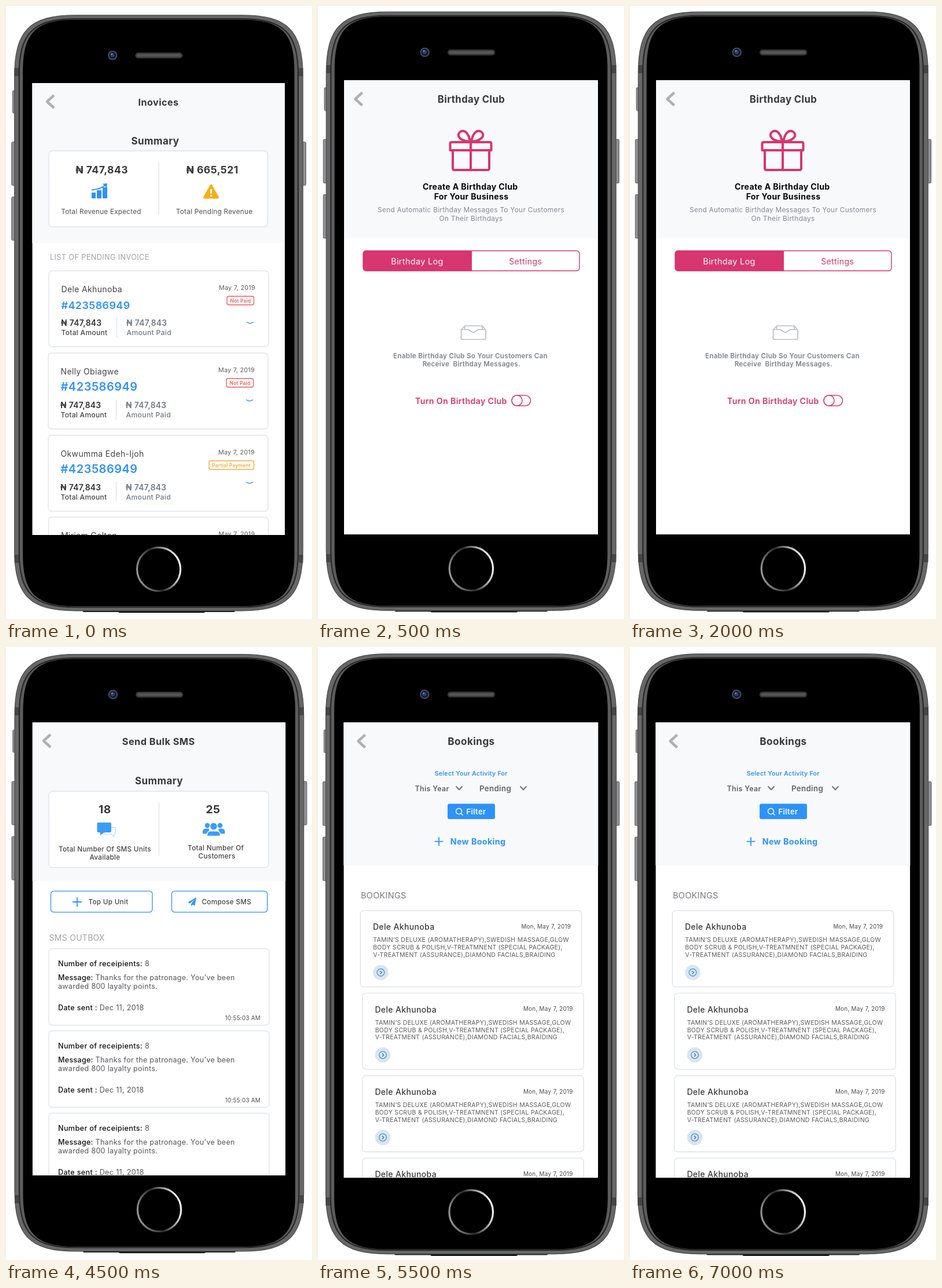
These frames come from a looping animation (529x1058 px, 8000 ms). An HTML page:

```html
<!DOCTYPE html>
<html lang="en">
<head>
<meta charset="utf-8">
<title>Business app screens</title>
<style>
html, body { margin: 0; width: 100%; height: 100%; overflow: hidden; background: #fff; }
svg { display: block; width: 100vw; height: 100vh; }
text { font-family: Inter, "Open Sans", sans-serif; letter-spacing: .025em; white-space: pre; font-optical-sizing: none; }
</style>
</head>
<body>
<svg id="stage" viewBox="0 0 529 1058" xmlns="http://www.w3.org/2000/svg"></svg>
<script>
const BLUE = '#2d93fb', PINK = '#d7366f', INK = '#38383b', GREY = '#737a84', EDGE = '#dfe4ec';
const LOOP = 8000, CUTS = [0, 500, 3000, 5500];
const CURRENCY = '\u20a6';

const box = (x, y, x2, y2, r, fill, stroke = 'none', w = 1.3) =>
  `<rect x="${x}" y="${y}" width="${x2 - x}" height="${y2 - y}" rx="${r}" fill="${fill}" stroke="${stroke}" stroke-width="${w}"/>`;
const line = (d, color, w = 1.5, fill = 'none') =>
  `<path d="${d}" fill="${fill}" stroke="${color}" stroke-width="${w}" stroke-linejoin="round"/>`;
const shape = (d, color) => `<path d="${d}" fill="${color}"/>`;
const dot = (x, y, r, fill, stroke = 'none', w = 1.5) =>
  `<circle cx="${x}" cy="${y}" r="${r}" fill="${fill}" stroke="${stroke}" stroke-width="${w}"/>`;
const text = (x, y, str, size, color = INK, weight = 400, anchor = 'start') =>
  `<text x="${x}" y="${y}" font-size="${size}" fill="${color}" font-weight="${weight}" text-anchor="${anchor}">${str}</text>`;
const mid = (x, y, str, size, color, weight) => text(x, y, str, size, color, weight, 'middle');
const end = (x, y, str, size, color, weight) => text(x, y, str, size, color, weight, 'end');
const at = (x, y, body) => `<g transform="translate(${x} ${y})">${body}</g>`;

// Rectangle whose corners ease into the straight sides
const smoothBox = (x, y, x2, y2, r, fill, stroke, w) => {
  const n = r * .25, f = r - n;
  return line(`M${x} ${y + r}c0 ${-f} ${n} ${-r} ${r} ${-r}H${x2 - r}c${f} 0 ${r} ${n} ${r} ${r}` +
    `V${y2 - r}c0 ${f} ${-n} ${r} ${-r} ${r}H${x + r}c${-f} 0 ${-r} ${-n} ${-r} ${-r}z`
      .replace(`c${f} 0 ${r} ${n}`, `c${f} 0 ${r} ${n}`), stroke, w, fill);
};

const card = (x, y, x2, y2) => box(x, y, x2, y2, 6, '#fff', EDGE, 1.4);
const header = (bottom, title, cx, base, size, backX, backY) =>
  box(40, 120, 490, bottom, 0, '#f8f9fb') +
  line(`M${backX + 12} ${backY - 11}l-12 11 12 11`, '#b0b0b1', 4.5) +
  mid(cx, base, title, size, INK, 700);
const plus = (x, y, r) => line(`M${x - r} ${y}h${2 * r}M${x} ${y - r}v${2 * r}`, BLUE, 1.8);

function phone() {
  const side = (x, y, y2) => box(x, y, x + 7, y2, 2, '#929396', '#5b5b5d', 1);
  const bands = [104, 946].map(y => box(15, y, 22.5, y + 14, 0, '#454546') + box(507.5, y, 515, y + 14, 0, '#454546')).join('');
  return side(11.8, 143, 182) + side(10, 232, 307) + side(10, 327, 402) + side(513, 232, 307) +
    box(133, 1038, 397, 1045, 2, '#111') + box(195, 1038, 345, 1046.3, 2, '#111') +
    smoothBox(15, 12.5, 514.7, 1043, 106, '#676768', '#4b4b4c', 1.2) + bands +
    smoothBox(23, 19, 506.5, 1036.5, 97, '#5c5c5d', '#252526', 2) +
    smoothBox(29.5, 20.5, 500, 1035, 90, '#000', 'none', 0) +
    dot(185, 82, 8.2, '#4b4c50') + dot(185, 82, 6, '#15182b') + dot(184.5, 81.5, 3.6, '#22408f') + dot(183.5, 80, 1.3, '#7890cf') +
    box(224.5, 77.5, 306, 87, 4.8, '#3d3d3e', '#29292a', 1) + box(227, 80, 303.5, 84.5, 2.2, '#555556') +
    dot(265, 971, 37.6, '#000', 'url(#ring)', 3.2);
}

function invoices() {
  const rows = [
    ['Dele Akhunoba', 'Not Paid', 17.9, 74, 457],
    ['Nelly Obiagwe', 'Not Paid', 20, 73, 599],
    ['Okwumma Edeh-Ijoh', 'Partial Payment', 20, 73, 741],
    ['Miriam Colton', 'Not Paid', 20, 73.5, 882]
  ];
  const sum = CURRENCY + ' 747,843';
  const row = ([name, state, idSize, x, y], i) => {
    const part = state[0] === 'P', color = part ? '#f5ab3a' : '#ec6060';
    const left = part ? 278 : 308, drop = i ? 82 : 90;
    return at(x, y, card(0, 0, 380, 131) +
      text(21.5, 37, name, 14, '#444') +
      end(357, 33, 'May 7, 2019', 10.8, '#5d5d60') +
      box(left, 44, part ? 355.5 : 354.5, 58.8, 3, '#fff', color, 1.4) +
      mid((left + 355) / 2, 54.6, state, 8.4, color, 600) +
      text(21.5, i ? 65 : 66, '#423586949', idSize, BLUE, 600) +
      text(21, 94.5, sum, 13.8, '#303033', 600) +
      text(21.5, 110.8, 'Total Amount', 12, '#444', 500) +
      line('M117.5 80v35', EDGE, 1.3) +
      text(134, 95.3, sum, 13.8, GREY, 600) +
      text(134.5, 110.8, 'Amount Paid', 12.2, GREY, 500) +
      line(`M342 ${drop - 1.5}q6 4.5 12 0`, BLUE, 1.3));
  };
  const chart = shape('M148 322h7v10h-7zM157 318h8v14h-8zM167 313h8v19h-8z', BLUE) +
    line('M148 317.5Q164 316 172 309', BLUE, 2) + shape('M167 307l8-1-1 8z', BLUE);
  const warn = line('M354.5 310L366 330.5H343z', '#f5b014', 4, '#f5b014') +
    line('M354.5 316v7.5', '#fff', 3) + dot(354.5, 327.5, 1.8, '#fff');
  return header(409, 'Inovices', 263.5, 171.5, 16.2, 71, 165) +
    mid(258, 239, 'Summary', 17, INK, 700) +
    card(74, 250, 452.5, 381) + line('M264 270v91', EDGE, 1.3) +
    mid(165.7, 289, sum, 17.6, INK, 700) + mid(356.7, 289, CURRENCY + ' 665,521', 17.6, INK, 700) +
    chart + warn +
    mid(164.5, 358.5, 'Total Revenue Expected', 11.6, '#505054') +
    mid(360, 358.5, 'Total Pending Revenue', 11.7, '#505054') +
    text(76, 438, 'LIST OF PENDING INVOICE', 12.8, '#a2a2a5') +
    rows.map(row).join('');
}

function birthday() {
  const gift = line('M233 249v31q0 3 3 3h57q3 0 3-3v-31M231 235h66q2.5 0 2.5 2.5V249H228.5v-11.5q0-2.5 2.5-2.5zM264 235v48' +
    'M263 234C260 218 253 213 246 217C238 223 245 233 263 234M265 234C268 218 275 213 282 217C290 223 283 233 265 234', PINK, 4);
  const tray = line('M247.5 559v14.5q0 2 2 2h38.5q2 0 2-2V559l-6-7h-30zM247.5 558.5h12.5l8.5 5.5 8.5-5.5h13M253.5 552v6M284 552v6', '#bbbec2', 1.7);
  return header(400, 'Birthday Club', 265, 167, 16.7, 64.5, 160.5) + gift +
    mid(263.3, 316.5, 'Create A Birthday Club', 14.1, '#050505', 700) +
    mid(265, 334, 'For Your Business', 14, '#050505', 700) +
    mid(264.5, 356, 'Send Automatic Birthday Messages To Your Customers', 11.8, '#858a91') +
    mid(264.5, 370.5, 'On Their Birthdays', 11.9, '#858a91') +
    box(78, 422.5, 452, 457, 5, '#fff', PINK, 1.4) +
    shape('M83 422h183v35.5H83q-5 0-5-5v-25.5q0-5 5-5z', PINK) +
    mid(171.5, 445.5, 'Birthday Log', 14.4, '#fff') + mid(358.7, 445.5, 'Settings', 14.1, PINK) + tray +
    mid(263.5, 608, 'Enable Birthday Club So Your Customers Can', 11.7, '#7d838a', 600) +
    mid(265.3, 622, 'Receive  Birthday Messages.', 11.6, '#7d838a', 600) +
    text(168, 686.5, 'Turn On Birthday Club', 14.2, PINK, 600) +
    box(335, 672, 367.5, 690, 9, '#fff', PINK, 1.5) + dot(344, 681, 9, '#fff', PINK);
}

function sms() {
  const b = s => `<tspan font-weight="500" fill="#111">${s}</tspan>`;
  const row = y => at(74, y, card(0, 0, 381, 132) +
    text(16, 30.5, b('Number of receipients:') + ' 8', 12.7, '#55565a') +
    text(16, 54, b('Message:') + ' Thanks for the patronage. You\u2019ve been', 12.5, '#55565a') +
    text(16, 69, 'awarded 800 layalty points.', 12.5, '#55565a') +
    text(16, 106.5, b('Date sent :') + ' Dec 11, 2018', 12.6, '#55565a') +
    end(366, 123, '10:55:03 AM', 9.9, '#4d4d50'));
  const sky = '#3b9cf8';
  const bubbles = line('M170.5 311.5h18.5v11.5h-2v4l-5-4h-11.5z', '#a9d2fb', 1, '#fff') +
    shape('M159 303h21q2 0 2 2v13q0 2-2 2h-10l-7 5v-5h-4q-1.5 0-1.5-2v-13q0-2 1.5-2z', sky);
  const people = dot(348, 308, 4.3, sky) + dot(370, 308, 4.3, sky) +
    shape('M340 322v-3q0-5.5 6-5.5h5v9zM378.5 322v-3q0-5.5-6-5.5h-5v9z', sky) +
    line('M347.5 326.5v-2q0-7 7-7h9q7 0 7 7v2z', '#fff', 1.5, sky) + dot(359, 309.5, 6.5, sky, '#fff', 1.3);
  const plane = shape('M329 432l-15 9 4 1.7 8.5-7.7-6.5 8.5v4l2.3-2.8 4 1.7z', BLUE);
  return header(404, 'Send Bulk SMS', 263.7, 168.5, 16.4, 65, 162) +
    mid(264.5, 236.5, 'Summary', 17, INK, 700) +
    card(74, 249, 454, 380.5) + line('M264.5 269v91', EDGE, 1.3) +
    mid(171, 287, '18', 19.3, INK, 700) + mid(358, 287, '25', 19.3, INK, 700) + bubbles + people +
    mid(171, 353, 'Total Number Of SMS Units', 11.7, '#444', 500) + mid(171, 367, 'Available', 11.7, '#444', 500) +
    mid(362.7, 350.5, 'Total Number Of', 11.8, '#444', 500) + mid(364.5, 364.5, 'Customers', 11.8, '#444', 500) +
    box(77.5, 421.3, 253, 457.7, 5, '#fff', BLUE, 1.3) + box(286.5, 421.3, 451.7, 457.7, 5, '#fff', BLUE, 1.3) +
    plus(123, 440, 8) + text(142.5, 444.3, 'Top Up Unit', 11.7, '#444', 500) +
    plane + text(338.5, 444.3, 'Compose SMS', 11.7, '#444', 500) +
    text(74.5, 506.5, 'SMS OUTBOX', 13.9, '#a2a2a5') +
    [520.5, 662.5, 804.5].map(row).join('');
}

function bookings() {
  const services = [
    'TAMIN\u2019S DELUXE (AROMATHERAPY),SWEDISH MASSAGE,GLOW',
    'BODY SCRUB &amp; POLISH,V-TREATMNENT (SPECIAL PACKAGE),',
    'V-TREATMENT (ASSURANCE),DIAMOND FACIALS,BRAIDING'
  ];
  const row = i => at(i ? 76.7 : 73.2, 455 + i * 142.4, card(0, 0, 382.5, 131.5) +
    text(21.7, 33.2, 'Dele Akhunoba', 14, '#3c3c3f', 500) +
    end(364, 31, 'Mon, May 7, 2019', 9.95, '#4b4b4e') +
    services.map((s, k) => text(22, 54.3 + k * 12.9, s, 10.55, '#5c5c5f')).join('') +
    dot(35.3, 106.7, 13.3, '#dbe5ee') + dot(35.3, 106.7, 6.3, 'none', BLUE, 1.3) +
    line('M34.2 104l2.7 2.7-2.7 2.7', '#3c6fa5', 1.3));
  const caret = x => line(`M${x - 5.5} 240.5l5.5 5.8 5.5-5.8`, '#77787c', 2.3);
  return header(377, 'Bookings', 265, 169, 17.1, 69.5, 162.5) +
    mid(264.7, 222, 'Select Your Activity For', 10.6, BLUE, 600) +
    text(167.5, 249, 'This Year', 12.5, '#626367', 600) + caret(244) +
    text(279, 249, 'Pending', 13.3, '#626367', 600) + caret(355) +
    box(224, 270.5, 306, 297, 3, BLUE) +
    dot(243.5, 283.5, 5, 'none', '#fff', 1.4) + line('M247 287l3.5 3.5', '#fff', 1.5) +
    text(256.5, 289, 'Filter', 13, '#fff', 600) +
    plus(209, 335.7, 7.5) + text(228.7, 341, 'New Booking', 14.3, BLUE, 700) +
    text(74, 434, 'BOOKINGS', 14.4, '#77787b') +
    [0, 1, 2, 3].map(row).join('');
}

// Display rectangle of each screen: x, y, right, bottom, phone scale
const screens = [
  [invoices, 45.3, 133, 482, 913, .9977],
  [birthday, 45, 128, 484, 912, 1.0025],
  [sms, 45.7, 130, 483.2, 912, 1],
  [bookings, 44.3, 130, 484.3, 916, 1.005]
];

const defs = `<defs><linearGradient id="ring" x1="0" y1=".65" x2="1" y2=".35">
  <stop offset="0" stop-color="#9a9a9a"/><stop offset=".45" stop-color="#2b2b2b"/>
  <stop offset=".75" stop-color="#a8a8a8"/><stop offset="1" stop-color="#fff"/></linearGradient>` +
  screens.map(([, x, y, x2, y2], i) => `<clipPath id="view${i}">${box(x, y, x2, y2, 0, '#fff')}</clipPath>`).join('') + '</defs>';

const stage = document.getElementById('stage');
stage.innerHTML = defs + screens.map(([draw, x, y, x2, y2, k], i) =>
  `<g class="screen"><g transform="translate(${x} ${y}) scale(${k}) translate(-45.7 -130)">${phone()}</g>` +
  `<g clip-path="url(#view${i})">${box(x, y, x2, y2, 0, '#fff')}${draw()}</g></g>`).join('');
const groups = [...stage.querySelectorAll('.screen')];

function render(now) {
  const t = now % LOOP;
  const current = CUTS.filter(c => c <= t).length - 1;
  groups.forEach((g, i) => g.setAttribute('display', i === current ? 'inline' : 'none'));
}

const start = performance.now();
function tick() {
  render(performance.now() - start);
  requestAnimationFrame(tick);
}
tick();
</script>
</body>
</html>
```
